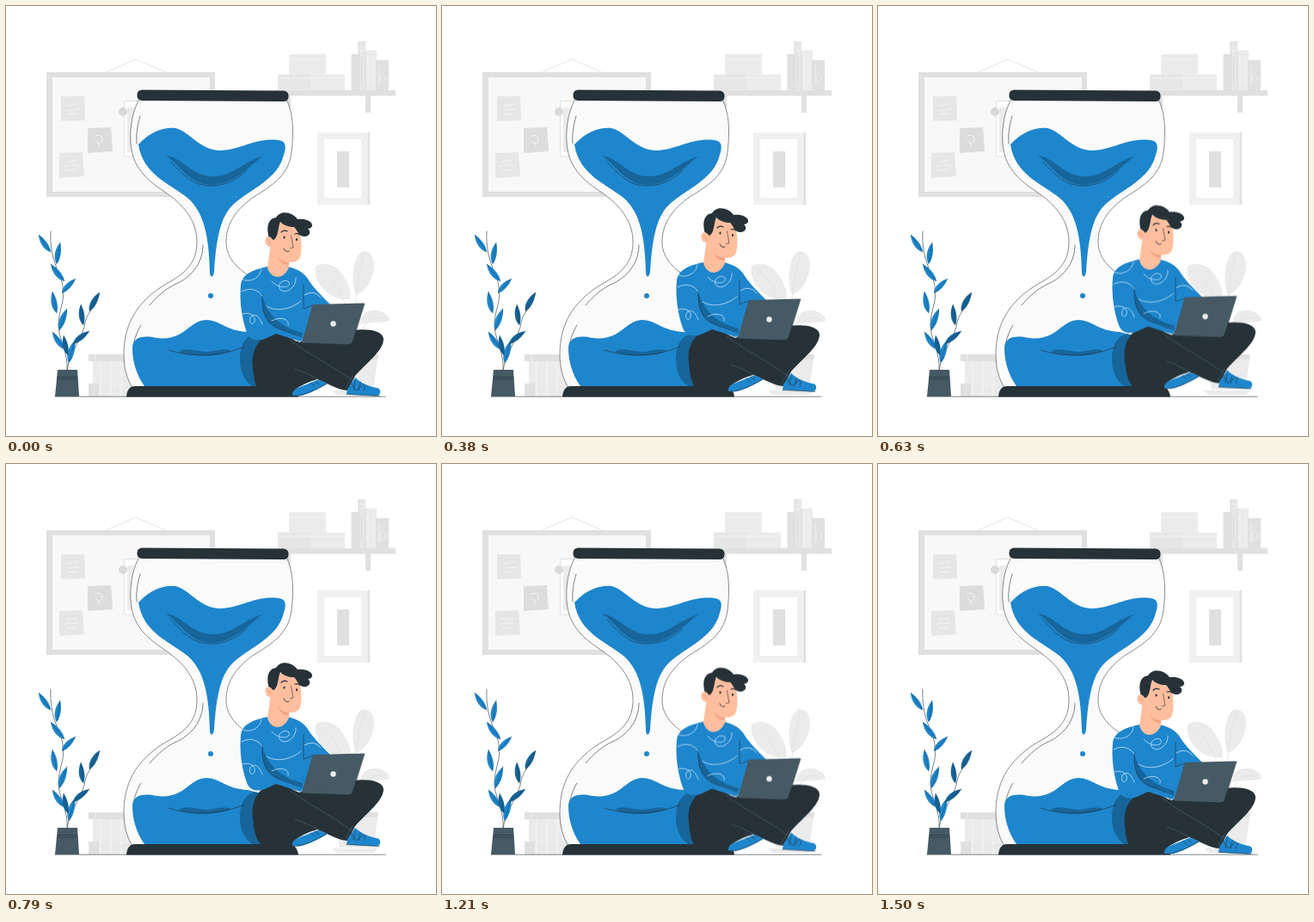
Write an HTML page that moves like this. It is 500 px wide and 500 px high and loops after 1540 ms.

```html
<!DOCTYPE html>
<html lang="en">
<head>
<meta charset="utf-8">
<title>Hourglass</title>
<style>
  html, body { margin: 0; width: 100%; height: 100%; overflow: hidden; background: #fff; }
  svg { display: block; width: 100vw; height: 100vh; }
  .man { animation: float 1540ms linear infinite; }
  @keyframes float {
    0%, 95%, 100% { transform: translateY(0); }
    47.5% { transform: translateY(-9.8px); }
  }
  .blue { fill: #1e86cd; }
  .deep { fill: #17659b; }
  .dark { fill: #263238; }
  .slate { fill: #455a64; }
  .skin { fill: #ffbe9d; }
  .g1 { fill: #f5f5f5; }
  .g2 { fill: #ebebeb; }
  .g3 { fill: #e0e0e0; }
  .line { fill: none; stroke: #263238; stroke-width: .6; stroke-linecap: round; stroke-linejoin: round; }
  .pale { fill: none; stroke: #e0e0e0; stroke-width: .8; }
  .curl { fill: none; stroke: #e3f1fb; stroke-width: .7; stroke-linecap: round; }
</style>
</head>
<body>
<svg viewBox="0 0 500 500">
  <defs>
    <path id="leaf" d="M0 0C.2 -.2 .65 -.22 1 0C.68 .14 .25 .15 0 0Z"/>
    <path id="sand" d="M147 398C147 387 156 383 170 385C206 393 212 366 232 365C249 365 256 378 281 379L330 392V442H161C151 428 147 412 147 398Z"/>
    <clipPath id="inSand"><use href="#sand"/></clipPath>
  </defs>

  <!-- board -->
  <path class="pale" d="M116 77L151 62L186 77"/>
  <path class="g3" d="M47 77H243V222H47Z"/>
  <path fill="#f8f8f8" d="M54 83H237V216H54Z"/>
  <path fill="#e6e6e6" d="M64 105L91 105L92 133L64 134Z"/>
  <path fill="#dcdcdc" d="M95 142L122 141L124 169L95 171Z"/>
  <path fill="#e6e6e6" d="M62 171L89 170L91 198L62 200Z"/>
  <path fill="none" stroke="#f7f7f7" stroke-width=".9" d="M71 116L84 114M73 121L86 120M72 126L82 125M103 152Q107 148 112 153Q113 158 108 160L105 157M107 160L109 164M69 181L83 179M67 187Q76 183 84 186M70 191L81 190"/>
  <path fill="#fff" stroke="#e0e0e0" d="M137.500 110.500H175V175H137.500Z"/>
  <path class="g2" d="M141 118H150V170H141Z"/>
  <circle cx="136" cy="123" r="5" fill="#d9d9d9"/>

  <!-- shelf -->
  <path class="g3" d="M314 98H453V104.500H424V124H418V104.500H331V124H325V104.500H314Z"/>
  <path class="g2" d="M329 56H372V80H329Z"/>
  <path fill="#e6e6e6" d="M316 79.500H354V98H316Z"/>
  <path class="g2" d="M354 79.500H394V98H354Z"/>
  <path fill="none" stroke="#f7f7f7" stroke-width=".8" d="M329 62H372M354 84H394M316 84H354"/>
  <path class="g3" d="M401.500 56H410V98H401.500ZM431 63H445V98H431Z"/>
  <path fill="#e6e6e6" d="M409.500 41H418V98H409.500Z"/>
  <path class="g2" d="M418 51.500H431V98H418Z"/>
  <path class="pale" style="stroke:#f5f5f5" d="M411 47H417M411 52H417M421 58V90M427 58V90M434 68V92"/>
  <ellipse cx="438" cy="84" rx="3" ry="5" class="pale" style="stroke:#f2f2f2"/>
  <path fill="none" stroke="#d5d5d5" stroke-width=".7" d="M410 41V98M418 52V98M431 63V98M413.500 60V90"/>

  <!-- picture -->
  <path class="g3" d="M420 147H423V231H420Z"/>
  <path fill="#f0f0f0" d="M362 147H420.500V231H362Z"/>
  <path fill="#fff" d="M370 155H413V223H370Z"/>
  <path class="g3" d="M385 169H399V211H385Z"/>

  <!-- grey plant -->
  <path class="g2" d="M360 303C369 296 384 301 391 312C399 323 402 335 400 341C386 343 374 336 367 327C361 319 358 309 360 303Z"/>
  <path class="g2" d="M407 336C401 322 402 291 415 285C427 284 431 300 426 313C422 326 415 333 407 336Z"/>
  <path class="g2" d="M412 370C412 359 419 353 431 354C439 355 446 360 446 366C436 369 425 367 412 370Z"/>
  <path class="pale" d="M366 306Q390 322 403 375M416 291Q404 330 405 400M440 363Q414 357 406 400"/>
  <path class="g2" d="M381 405H433L427 446H388Z"/>
  <path class="g3" d="M383 405H433L432 411H384Z"/>
  <path class="g2" d="M379 447H433L428 452H384Z"/>

  <!-- binders -->
  <path class="g3" d="M96 405H146V413H96Z"/>
  <path class="g2" d="M101 413H146V439H101ZM108 439H146V454H108Z"/>
  <path class="g3" d="M96 439H108V454H96Z"/>
  <path fill="none" stroke="#f8f8f8" stroke-width=".8" d="M104 405V413M110 413V454M122 413V454M134 413V454"/>
  <g class="pale"><circle cx="115" cy="446" r="3.500"/><circle cx="127" cy="446" r="3.500"/><circle cx="139" cy="446" r="3.500"/></g>

  <path class="line" d="M57 454.200H441"/>

  <!-- vase -->
  <path class="line" d="M71 424C73 403 60 385 61 370C61 355 69 342 66 330C67 313 50 300 52 262M71 424C73 405 91 382 92 368Q94 358 103 349"/>
  <g id="leaves"></g>
  <path class="slate" d="M60 423H83L85 454H57Z"/>
  <path class="line" d="M60 431.500H83M59.500 434H83.500"/>

  <!-- hourglass -->
  <path fill="#fafafa" stroke="#263238" stroke-width=".55" d="M155 108C145 126 143 150 146 167C150 190 165 203 183 215C207 231 222 250 222 274C222 297 211 309 190 321C156 340 137 366 137 405C137 422 141 434 147 444H333C340 430 342 417 341 403C340 370 318 339 286 316C267 304 256 292 256 274C256 253 268 236 288 222C313 207 329 195 332 170C335 143 334 126 326 108Z"/>
  <path class="line" d="M156 128C153 138 151 149 152 160M229 278C229 300 214 316 198 323C187 328 176 337 167 348M157 371C152 379 149 388 148 396" stroke-width=".5"/>
  <path class="blue" d="M154 161C169 145 184 141 197 142C214 146 226 169 251 168C276 166 290 153 317 156C326 157 326 164 323 173C316 202 285 212 264 231C247 247 244 280 242 309C241 316 237 317 237 309C236 270 231 240 211 223C191 207 159 196 154 161Z"/>
  <path class="deep" d="M186 174C205 176 216 198 240 198C263 199 277 180 298 175C282 187 264 208 239 208C213 208 203 185 186 174Z"/>
  <path class="line" d="M192 181C211 203 222 209 239 209C256 209 270 201 280 191"/>
  <circle class="blue" cx="238" cy="337" r="3"/>
  <use href="#sand" class="blue"/>
  <path class="deep" clip-path="url(#inSand)" d="M298 380C281 380 272 391 272 411C272 428 279 438 288 443H310V380Z"/>
  <path class="deep" d="M201 402C211 396 220 402 232 402C243 402 250 397 262 401C248 408 215 409 201 402Z"/>
  <path class="line" d="M189 400C216 409 250 408 277 396"/>
  <rect class="dark" x="152.500" y="98" width="176" height="12.500" rx="5.500" transform="rotate(.4 240 104)"/>
  <path class="dark" d="M140 454.500Q141 442 150 442H329Q338 442 340 454.500Z"/>

  <g class="man">
    <!-- legs -->
    <path class="dark" d="M287 420C284 398 297 381 316 380C327 382 335 390 342 391L398 390L403 377C420 375 438 377 439 387C439 401 419 415 406 430L397 447C390 447 379 442 371 438L362 434C352 437 341 442 335 447L332 454H303C292 453 288 436 287 420Z"/>
    <path class="line" style="stroke:#52656e" d="M331 389C350 404 379 418 402 435M371 438C359 432 348 426 336 422M395 444L403 430"/>

    <!-- shoes -->
    <path class="blue" d="M333 453C332 446 339 444 347 441L363 434.500L374 439C364 445 353 451 341 453.500Z"/>
    <path class="blue" d="M406 432C412 438 423 443 433 444.500C437 448 435 453 431 453.500L396 451.500L397 445Z"/>
    <path class="line" d="M334 453.500C348 453 360 446 373 439M396 451.500L434 453.500M354 438L359 442M359 436L364 440M401 438L407 447L416 440M406 436L404 446M412 438L410 447M418 441L416 447"/>

    <!-- sweater -->
    <path class="blue" d="M304 303C286 307 274 312 273 325C271 345 275 367 281 382C285 389 293 390 301 387L314 381L342 390L355 383L377 347C367 337 358 328 352 319C347 310 339 306 328 303Q314 317 304 303Z"/>
    <path class="deep" d="M298 338C297 356 302 370 319 376L344 384L345 380C326 376 306 364 298 338Z"/>
    <path class="line" d="M346 324L346 352L357 348M298 335C297 356 302 370 319 376L344 385" stroke-width=".6"/>
    <g class="curl">
      <path d="M275 318C284 322 296 316 297 306M309 320C319 331 332 327 329 321C323 316 314 324 319 330C326 336 338 326 337 316M274 332C285 326 294 331 298 337M303 349C314 356 331 353 343 343M347 336Q358 329 366 339M275 358C284 355 291 361 289 367C286 373 281 367 285 361C291 356 296 364 298 370M309 366C321 360 330 365 328 371"/>
    </g>

    <!-- head -->
    <path class="skin" d="M309 268L304 304C307 317 322 320 329 304V293Z"/>
    <path fill="#f4a07c" d="M316 291C320 297 324 298 329 298V301C322 301 318 297 316 291Z"/>
    <path class="skin" d="M312 259C316 248 337 248 342 263C344 277 344 288 341 294C337 299 328 299 322 296C314 291 311 279 312 259Z"/>
    <path class="dark" d="M306 270C302 257 305 247 314 246C319 237 333 239 339 248C347 247 357 250 356 256C355 258 353 259 351 259C356 263 352 269 346 268C340 267 339 261 335 257C329 257 323 255 319 251C317 255 317 259 316 263C315 268 313 271 311 272Z"/>
    <ellipse class="skin" cx="306" cy="274" rx="4.500" ry="6" transform="rotate(-18 306 274)"/>
    <path class="line" style="stroke:#d9805c" d="M304 272Q307 273 308 277"/>
    <ellipse class="dark" cx="323.500" cy="269" rx="1.100" ry="1.600"/>
    <ellipse class="dark" cx="338" cy="271.500" rx="1.100" ry="1.600"/>
    <path class="line" style="stroke-width:1.200" d="M320 263Q323 260 327 262M336 265Q339 264 342 266"/>
    <path class="line" d="M331.500 267L334 281L330.500 281.500"/>
    <path class="line" style="stroke-width:.9" d="M323 282Q325 287 329 285"/>

    <!-- laptop -->
    <path class="dark" d="M339 393L346 388L401 388L398 395H339Z"/>
    <path class="slate" d="M359 347L416 345.500Q417 345.500 416.500 347L403 390Q402 393.500 398 393.500L344 391.500L356 349Q357 347 359 347Z"/>
    <path class="line" d="M417 346L403 391Q402 394 398 394"/>
    <circle cx="380.500" cy="369.500" r="3.200" fill="#ececec"/>
  </g>
</svg>
<script>
  // base x, base y, tip x, tip y, shade
  const leaves = [
    [52, 286, 38, 266], [59, 300, 63, 275], [68, 320, 52, 300], [65, 334, 81, 317],
    [59, 357, 54, 332], [62, 377, 71, 352], [68, 399, 54, 379], [73, 415, 80, 389],
    [90, 371, 87, 347, 1], [97, 355, 109, 333, 1], [78, 393, 97, 378, 1], [72, 406, 67, 383, 1]
  ];
  document.getElementById("leaves").innerHTML = leaves.map(([x, y, tx, ty, shade]) => {
    const turn = Math.atan2(ty - y, tx - x) * 180 / Math.PI;
    const size = Math.hypot(tx - x, ty - y);
    return `<use href="#leaf" class="${shade ? "deep" : "blue"}"
      transform="translate(${x} ${y}) rotate(${turn}) scale(${size})"/>
      <path class="line" stroke-opacity=".7" d="M${x} ${y}L${tx} ${ty}"/>`;
  }).join("");
</script>
</body>
</html>
```
